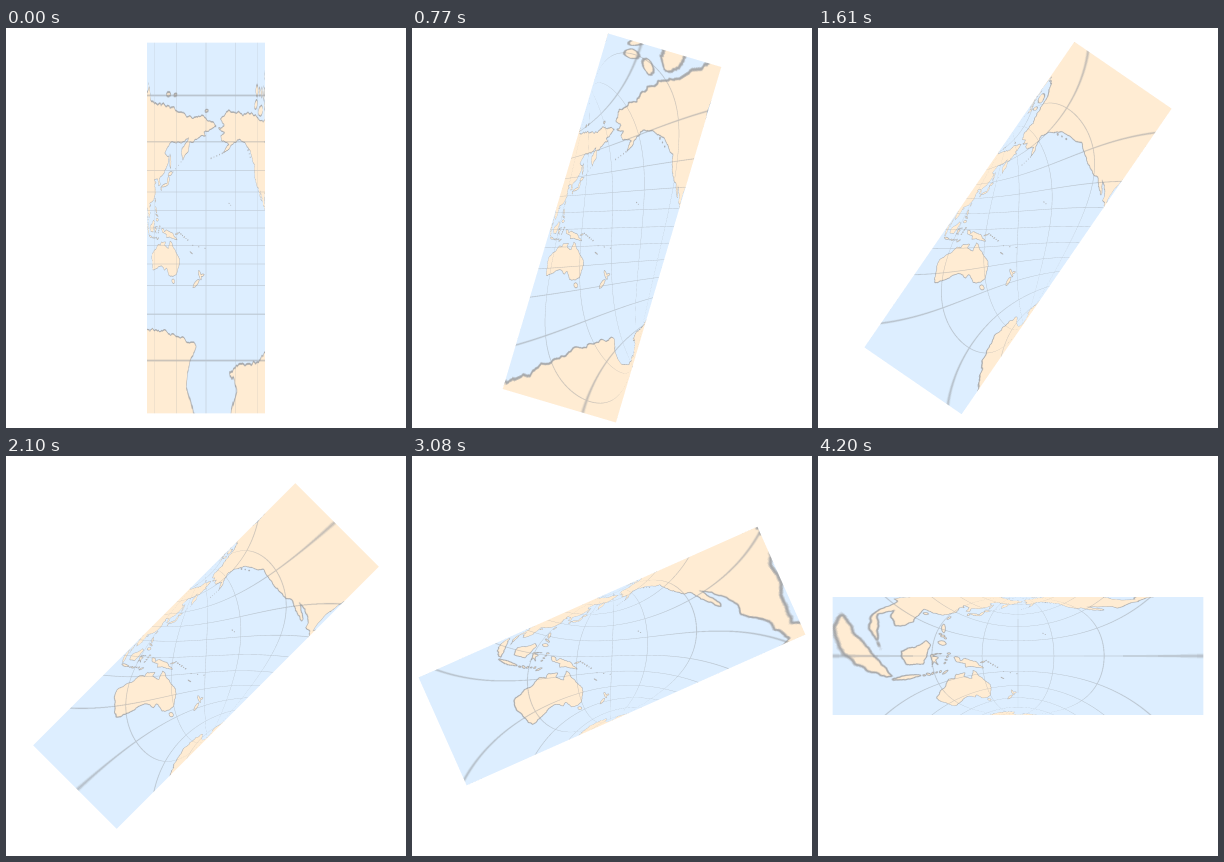
A matplotlib script for the animation above (4.27 s loop, 400 by 400 pixels).

```python
import numpy as np
import matplotlib.pyplot as plt
from matplotlib.animation import FuncAnimation

SIZE, SUB = 400, 3            # stage and supersampling
FRAMES, STEP = 61, 70
HALF_W, HALF_H = 59.0, 185.4  # the cylinder, seen from the side
SCALE = 65.4                  # Mercator scale along its axis
RES = 8                       # texels per degree
N = 180 * RES + 1

OCEAN, LAND = (221, 238, 255), (255, 236, 211)
COAST, GRID = (166, 167, 169), (150, 154, 158)

rng = np.random.default_rng(4)

# Key points of the large coasts as (longitude 0..360, latitude).
asia = [
    (85, 75), (104, 77.5), (110, 74), (127, 73), (140, 72.5), (160, 69.7), (177, 69.7),
    (190, 66.1), (178, 64), (179.5, 62.5), (164, 60), (162.5, 55.5), (156.7, 51),
    (156, 57), (163, 61.8), (155, 59.4), (142, 59.2), (135.5, 54.7), (141, 53),
    (140, 49), (135, 43.5), (127.5, 39.5), (129.2, 35.5), (126.5, 34.5), (125, 39.3),
    (118, 39), (122.3, 37), (119.5, 35), (121.8, 30), (117, 23.5), (107, 21), (109, 13),
    (105, 8.8), (101, 13.3), (99.5, 9.5), (104, 1.4), (100.3, 5.5), (98.5, 11),
    (97, 16.6), (94.5, 16.5), (91, 22), (80, 22)]
america = [
    (203, 71.3), (219, 69.6), (232, 70.2), (245, 68.2), (264, 68), (266, 71.8), (275, 69),
    (275, 64), (265.3, 60), (275, 55), (277, 30), (266, 29.6), (262.4, 26), (262.2, 22),
    (264.5, 18.3), (268.5, 18.7), (273, 21.5), (271.5, 15.9), (277, 15.5), (276, 10.5),
    (272, 13), (265.5, 16.1), (255, 19.8), (254.5, 22.3), (246, 31.5), (250.2, 23.1),
    (244.8, 28), (242.5, 33), (239.4, 34.6), (236, 40), (235.5, 48.3), (230, 54),
    (222, 59.3), (212, 60.8), (204, 57.5), (197, 54.8), (203, 58.7), (195, 60.5),
    (194.5, 62.5), (199, 64), (192, 65.6), (198, 66.5), (194, 68.6)]
australia = [
    (113.7, -22.5), (122.2, -18), (126, -14), (129.5, -14.8), (131, -12), (136.8, -12.2),
    (135.5, -14.9), (140.5, -17.5), (142.5, -10.8), (145.5, -15.2), (149, -20.5),
    (153.3, -26), (152.5, -32.3), (150, -37.5), (146.5, -38.9), (140.5, -38),
    (137.8, -33), (135.5, -34.7), (131, -31.5), (126, -32.3), (120, -33.9),
    (115.3, -34.3), (113.5, -26)]
antarctica = [
    (85, -66.5), (110, -66.2), (136, -66.2), (150, -68.5), (170.5, -71.5), (163.5, -76),
    (160.5, -80), (168, -83.4), (185, -84.8), (204, -84), (212, -80.5), (203, -77.4),
    (218, -75.6), (245, -74.8), (262, -73), (275, -73), (275, -90), (85, -90)]
new_guinea = [
    (131, -.8), (134.2, -1), (135, -3.3), (138, -1.6), (145, -4.2), (150.8, -10.4),
    (143.5, -8.5), (138, -8.3), (138, -5.5), (132.9, -4)]
borneo = [
    (109, 1.5), (113, 3.2), (116.8, 7), (119, 5), (118, 1), (116.3, -3.6), (110.3, -3)]
sulawesi = [
    (119.5, -5.5), (119.5, .6), (125, 1.5), (120.3, 0), (123, -.9), (121.6, -2),
    (122.5, -4.7), (120.8, -2.8)]


def strip(x0, y0, x1, y1, width):
    """Spindle-shaped island between two tips."""
    t = np.linspace(0, 1, 7)
    d = np.array([x1 - x0, y1 - y0])
    side = np.array([-d[1], d[0]]) / np.hypot(*d)
    spine = (x0, y0) + t[:, None] * d
    half = width / 2 * np.sin(np.pi * t)[:, None] ** .6 * side
    return np.vstack([spine + half, (spine - half)[-2:0:-1]])


def chain(x0, y0, x1, y1, count, size):
    """Row of small, randomly turned islands."""
    for t in np.linspace(0, 1, count):
        x, y = x0 + (x1 - x0) * t, y0 + (y1 - y0) * t
        a = rng.uniform(-1, 1)
        r = size * rng.uniform(.35, .65)
        dx, dy = r * np.cos(a), r * np.sin(a)
        yield strip(x - dx, y - dy, x + dx, y + dy, r)


east_asia = [
    (142.5, 54.3, 143, 46, 1.8), (140, 42, 145.3, 43.8, 2.4), (141, 41.4, 139.3, 35, 2.4),
    (131, 34, 140.5, 36, 2), (130.3, 33.8, 131, 31.2, 1.7), (121.7, 25.2, 120.8, 22, 1.2),
    (108.7, 19, 111, 19.8, 1.4), (121, 18.5, 123.5, 13, 2), (122, 7.5, 126.5, 7, 2.5)]
south = [
    (95.3, 5.6, 105.8, -5.7, 3.4), (105.2, -6.6, 114.5, -8.2, 1.4),
    (123.5, -10.3, 127.2, -8.4, .9), (148.4, -5.7, 152.3, -4.4, 1),
    (164, -20.1, 167, -22.3, .6), (144.8, -41, 147.7, -43.3, 2.8),
    (172.8, -34.5, 175.3, -41.5, 2), (174.5, -38.5, 178.4, -37.8, 1.6),
    (173.5, -41, 167, -46.3, 2.6)]
north = [
    (232, 50.7, 236.4, 48.4, 1), (235, 72, 241, 73.5, 2.2), (242, 70.5, 254, 71.5, 3),
    (259, 72.5, 263, 72.6, 2), (265, 78.5, 276, 82, 3), (137.5, 75.2, 143.5, 75.3, 1),
    (146.5, 75, 150.8, 75.2, .6), (178.7, 71, 182.4, 71.2, .7)]
chains = [
    (185, 52, 196, 54.6, 5, .8), (146, 44, 155, 50, 4, .5), (224, 58, 228.5, 52.5, 4, 1),
    (240, 76, 268, 75, 6, 4), (122, 12, 125, 10.5, 3, 2), (115.5, -8.5, 123, -8.5, 5, 1.6),
    (126, -4, 128.3, 1.5, 4, 1.6), (153, -4, 162, -10.5, 6, 1.2),
    (167, -15, 179, -17.5, 3, .8), (203, 21, 204.7, 19.5, 2, .8)]

SHAPES = [asia, america, australia, antarctica, new_guinea, borneo, sulawesi]
SHAPES += [strip(*s) for s in east_asia + south + north]
SHAPES += [isle for c in chains for isle in chain(*c)]


def rough(shape, levels=4):
    """Make a coast ragged by midpoint displacement, turning one way round."""
    p = np.array(shape, float)
    q = np.roll(p, -1, axis=0)
    if np.sum(p[:, 0] * q[:, 1] - p[:, 1] * q[:, 0]) < 0:
        p = p[::-1]
    for _ in range(levels):
        d = np.roll(p, -1, axis=0) - p
        size = np.hypot(*d.T)
        k = rng.normal(0, 1, len(p)).clip(-1.5, 1.5)
        k *= np.minimum(.08 * size, .45) / np.maximum(size, 1e-9)
        mid = p + d / 2 + np.column_stack([-d[:, 1], d[:, 0]]) * k[:, None]
        p = np.stack([p, mid], axis=1).reshape(-1, 2)
    return p


def land_mask():
    """Scanline fill by winding number on the lon/lat grid."""
    turns = np.zeros((N, N + 1), np.int8)
    for shape in SHAPES:
        p = (rough(shape) - (90, -90)) * RES
        for (x0, y0), (x1, y1) in zip(p, np.roll(p, -1, axis=0)):
            lo, hi = sorted((y0, y1))
            rows = np.arange(max(int(np.ceil(lo)), 0), min(int(np.ceil(hi)), N))
            if len(rows):
                x = x0 + (rows - y0) * (x1 - x0) / (y1 - y0)
                cols = np.clip(np.ceil(x), 0, N).astype(int)
                turns[rows, cols] += 1 if y1 > y0 else -1
    return np.cumsum(turns, axis=1, dtype=np.int8)[:, :N] != 0


def blur(m, r=2):
    p = np.pad(m.astype(np.float32), r, mode="edge")
    w = 2 * r + 1
    rows = sum(p[i:i + N] for i in range(w))
    return sum(rows[:, i:i + N] for i in range(w)) / w ** 2


def blend(base, color, alpha):
    return base + (np.array(color, np.float32) - base) * alpha[..., None]


def make_texture():
    soft = blur(land_mask())
    tex = blend(np.full((N, N, 3), OCEAN, np.float32), LAND, np.clip(soft * 3 - 1, 0, 1))
    tex = blend(tex, COAST, 4 * soft * (1 - soft))
    deg = np.arange(N) / RES

    def lines(step):
        gap = np.abs((deg + step / 2) % step - step / 2)
        return .55 * np.clip(1.2 - gap * 4, 0, 1)

    grid = np.maximum(lines(15)[:, None], lines(30)[None, :])
    return blend(tex, GRID, grid).round().astype(np.uint8)


TEXTURE = make_texture()
axis = ((np.arange(SIZE * SUB) + .5) / SUB - SIZE / 2).astype(np.float32)
X, Y = axis[None, :], -axis[:, None]


def render(i):
    """Mercator cylinder tilted clockwise around a fixed globe."""
    a = np.radians(90 * i / (FRAMES - 1))
    sa, ca = np.float32(np.sin(a)), np.float32(np.cos(a))
    v, u = X * sa + Y * ca, X * ca - Y * sa
    inside = (np.abs(v) < HALF_H) & (np.abs(u) < HALF_W)
    v, u = v[inside] / np.float32(SCALE), u[inside] / np.float32(HALF_W)
    s, c = np.tanh(v), 1 / np.cosh(v)
    t = u * c
    lat = np.arcsin(np.clip(s * ca - t * sa, -1, 1))
    lon = np.arctan2(s * sa + t * ca, c * np.sqrt(1 - u * u))
    k = np.float32(180 / np.pi * RES)
    row = (lat * k + (90 * RES + .5)).astype(np.int32).clip(0, N - 1)
    col = (lon * k + (90 * RES + .5)).astype(np.int32).clip(0, N - 1)
    fine = np.full((SIZE * SUB, SIZE * SUB, 3), 255, np.uint8)
    fine[inside] = TEXTURE[row, col]
    total = np.zeros((SIZE, SIZE, 3), np.uint16)
    for j in range(SUB):
        for m in range(SUB):
            total += fine[j::SUB, m::SUB]
    return (total // SUB ** 2).astype(np.uint8)


fig = plt.figure(figsize=(4, 4), dpi=100, facecolor="white")
ax = fig.add_axes([0, 0, 1, 1])
ax.axis("off")
image = ax.imshow(render(0), interpolation="nearest", aspect="auto")


def update(i):
    image.set_data(render(i))
    return [image]


anim = FuncAnimation(fig, update, frames=FRAMES, interval=STEP, repeat=True,
                     repeat_delay=0, blit=False)
plt.show()
```
